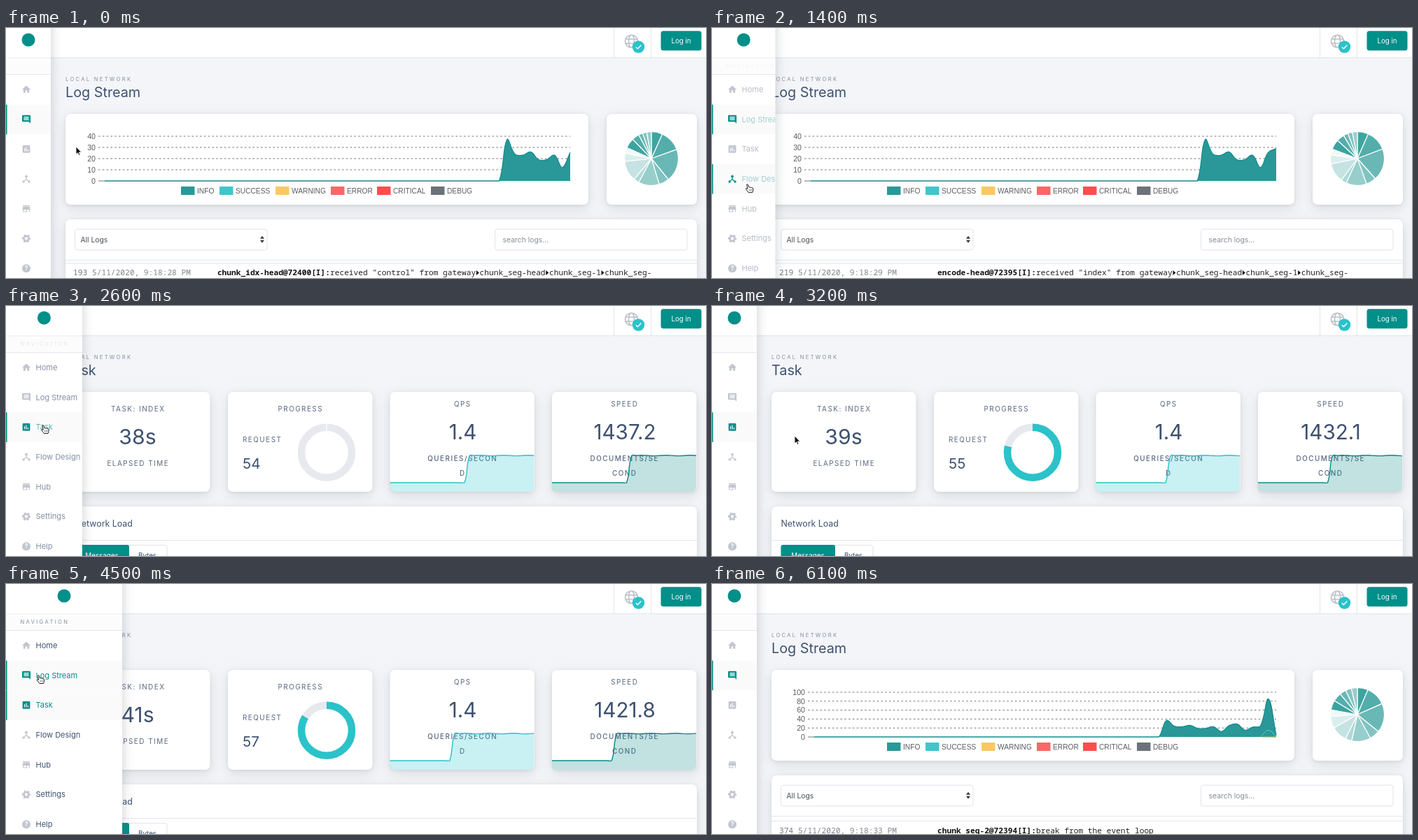
Animation, 1000 px wide and 358 px high, one loop 6200 ms. Source, as an HTML page:

```html
<!DOCTYPE html>
<html lang="en">
<head>
<meta charset="utf-8">
<title>Log dashboard</title>
<style>
html, body { margin: 0; width: 100%; height: 100%; overflow: hidden; background: #f4f5f9; }
svg { display: block; width: 1000px; height: 358px; font-family: Inter, Roboto, sans-serif; }
text { white-space: pre; }
.card { fill: #fff; filter: drop-shadow(0 1px 2px #5a616924) drop-shadow(0 5px 9px #5a61692c); }
.side { fill: #fff; filter: drop-shadow(0 0 8px #5a616950); }
.mono { font-family: "Noto Sans Mono", "DejaVu Sans Mono", monospace; }
.chart { font-family: "Liberation Sans", Arial, sans-serif; }
</style>
</head>
<body>
<svg id="stage" viewBox="0 0 1000 358"></svg>
<script>
const LOOP = 6200, STEP = 100;
const TEAL = '#008f89', CYAN = '#2bc2c9', INK = '#3d5170', LINE = '#e3e6ec';
const stage = document.getElementById('stage');

const clamp = v => Math.max(0, Math.min(1, v));
const easeOut = p => 1 - (1 - clamp(p)) ** 4;

// keys: [time, value, value...]; smooth steps between them
function track(keys, t) {
  let i = 0;
  while (i < keys.length - 2 && t >= keys[i + 1][0]) i++;
  const a = keys[i], b = keys[i + 1];
  const p = clamp((t - a[0]) / (b[0] - a[0])), s = p * p * (3 - 2 * p);
  return a.slice(1).map((v, k) => v + (b[k + 1] - v) * s);
}
const at = (rows, t) => rows.filter(r => r[0] <= t).pop();

const rect = (x, y, w, h, fill, extra = '') =>
  `<rect x="${x}" y="${y}" width="${w}" height="${h}" fill="${fill}" ${extra}/>`;
const card = (x, y, w, h) => `<rect class="card" x="${x}" y="${y}" width="${w}" height="${h}" rx="7"/>`;
const path = (d, fill, extra = '') => `<path d="${d}" fill="${fill}" ${extra}/>`;
const stroke = (d, color, width = 1, extra = '') =>
  path(d, 'none', `stroke="${color}" stroke-width="${width}" ${extra}`);
// y is the middle of the capitals
const text = (x, y, str, size, fill, extra = '') =>
  `<text x="${x}" y="${y + size * 0.363}" font-size="${size}" fill="${fill}" ${extra}>${str}</text>`;
const mid = (x, y, str, size, fill, gap = 0, extra = '') =>
  text(x + gap / 2, y, str, size, fill, `text-anchor="middle" letter-spacing="${gap}" ${extra}`);

// Smooth line through points, clamped below by floor
function curve(pts, floor, tension = 0.4) {
  const ctrl = pts.map((p, i) => {
    const a = pts[i - 1] || p, b = pts[i + 1] || p;
    const da = Math.hypot(p[0] - a[0], p[1] - a[1]), db = Math.hypot(b[0] - p[0], b[1] - p[1]);
    const move = f => [p[0] + f * (b[0] - a[0]), Math.min(floor, p[1] + f * (b[1] - a[1]))];
    return [move(-tension * da / (da + db)), move(tension * db / (da + db))];
  });
  return 'M' + pts[0] + pts.slice(1).map((p, i) => `C${ctrl[i][1]} ${ctrl[i + 1][0]} ${p}`).join('');
}

// ---- log stream page ----
const COUNTS = [37, 24, 23, 26, 19, 19, 23, 12, 25.5, 29, 15, 22, 25, 85, 4];
const LEGEND = [[250, 'INFO', '#2a9898'], [305, 'SUCCESS', '#41c5cb'], [385, 'WARNING', '#fac863'],
  [464, 'ERROR', '#fb6666'], [530, 'CRITICAL', '#fd4d4d'], [607, 'DEBUG', '#6c7279']];
// slice edges in degrees, drifting from the first set to the second
const PIE = [0, 24, 70, 141, 163, 208, 220, 264, 282, 294, 316, 332, 341, 350, 360];
const PIE_END = [0, 23, 66, 129, 151, 192, 206, 240, 266, 280, 301, 320, 334, 347, 360];

const ROUTE = 'gateway>chunk_seg-head>chunk_seg-1>chunk_seg-';
const LOGS = [
  [0, 193, 28, 'chunk_idx-head@72400', `received "control" from ${ROUTE}`, 350],
  [200, 199, 28, 'encode-2@72397', `received "index" from ${ROUTE}`, 345],
  [400, 204, 28, 'chunk_seg-1@72393', 'received "index" from gateway>chunk_seg-head>⚐', 350],
  [600, 210, 29, 'doc_idx-0@72402', `received "index" from ${ROUTE}`, 346],
  [800, 215, 29, 'join_all-0@72404', `received "index" from ${ROUTE}`, 351],
  [1200, 219, 29, 'encode-head@72395', `received "index" from ${ROUTE}`, 350],
  [1500, 0, 0, '', 'tail>encode-head>encode-2>⚐', 343.5],
  [4600, 228, 30, 'join_all-0@72404', 'collected 2/2 parts of IndexRequest', 343.5],
  [5500, 262, 31, 'encode-1@72396', `received "index" from ${ROUTE}`, 350],
  [5700, 305, 32, 'chunk_idx-1@72401', `received "control" from ${ROUTE}`, 347],
  [5900, 352, 33, 'chunk_seg-1@72393', 'break from the event loop', 351],
  [6000, 374, 33, 'chunk_seg-2@72394', 'break from the event loop', 352.5]
];
const CHAR = 6.72;

function logRow(t) {
  const [, num, sec, name, msg, y] = at(LOGS, t);
  let s = '', x = 463;
  if (num) {
    s += text(96, y, num, 11.2, '#70757c', 'font-weight="500"');
    s += text(123, y, `5/11/2020, 9:18:${sec} PM`, 11.2, '#80858c');
    s += text(463, y, name + '[I]:', 11.2, '#111', 'text-anchor="end" font-weight="700"');
  }
  msg.split('>').forEach((part, i) => {
    if (i) {
      s += path(`M${x + 0.6} ${y - 3}l4 3.5l-4 3.5z`, '#111');
      x += 5.3;
    }
    s += text(x, y, part, 11.2, '#222');
    x += part.length * CHAR;
  });
  const edge = v => v > 334 ? stroke(`M85 ${v}H987`, LINE) : '';
  return `<g class="mono">${s}</g>` + edge(y - 13) + edge(y + 12);
}

function lineChart(t) {
  const tall = t >= 5400, n = t < 1400 ? 9 : t < 4600 ? 10 : t < 5800 ? 14 : 15;
  const max = tall ? 100 : 40, tick = tall ? 20 : 10, x0 = tall ? 146 : 141;
  const grow = t >= 4600 ? easeOut((t - 5300) / 600) : 1;
  const point = (v, i) => [+(x0 + (806 - x0) * i / 59).toFixed(1), +(219 - v * grow * 64 / max).toFixed(1)];
  const vals = [...Array(60 - n).fill(0), ...COUNTS.slice(0, n)];
  let s = '';
  for (let v = 0; v <= max; v += tick) {
    const y = 219 - v * 64 / max;
    s += text(x0 - 13, y, v, 10.6, '#5a5d61', 'text-anchor="end"');
    s += v ? stroke(`M${x0 - 9} ${y}H806`, '#777', 1, 'stroke-dasharray="2.6 3.2"') : stroke(`M${x0 - 9} 219H${x0}`, '#777');
  }
  const d = curve(vals.map(point), 219);
  s += path(d + 'V219Z', '#2a9898') + stroke(d, '#108c8c', 1.3);
  if (n === 15) {
    s += stroke(curve([[0, 57], [15, 58], [1, 59]].map(p => point(...p)), 219), '#5fd0d4');
    s += stroke('M786 219.3H806', '#fac863', 1.2);
  }
  LEGEND.forEach(([x, label, color]) => {
    s += rect(x, 227, 19.5, 12, color) + text(x + 23, 233, label, 10.2, '#5a5d61');
  });
  return `<g class="chart">${s}</g>`;
}

function pie(t) {
  const turn = t >= 4600 ? easeOut((t - 4600) / 1000) : 1;
  const edge = i => {
    const deg = PIE[i] + (PIE_END[i] - PIE[i]) * t / LOOP, a = deg * turn * Math.PI / 180;
    return `${922 + 38.5 * Math.sin(a)} ${187 - 38.5 * Math.cos(a)}`;
  };
  return PIE.slice(1).map((_, i) => {
    const alpha = 0.79 - (i % 9) * 0.092;
    return path(`M922 187L${edge(i)}A38.5 38.5 0 0 1 ${edge(i + 1)}Z`, '#0a8b87',
      `fill-opacity="${alpha}" stroke="#fff" stroke-width="1.2"`);
  }).join('');
}

function heading(title) {
  return text(85, 73, 'LOCAL NETWORK', 7.6, '#818ea3', 'letter-spacing="2.3"') +
    text(85, 92, title, 19.8, INK);
}

function logPage(t) {
  const box = x => rect(x, 288, 274.5, 30, '#fff', 'rx="3.5" stroke="#dfe3ea"');
  let s = heading('Log Stream') + card(85, 123, 747, 130) + card(858, 123, 129, 130) +
    lineChart(t) + pie(t) + card(85, 274, 902, 110) + box(98.5) + box(698.5) +
    text(106.5, 303, 'All Logs', 10.3, '#495057') +
    path('M363 301.8l3-4l3 4zM363 303.8l3 4l3-4z', '#343a40') +
    text(709.5, 303, 'search logs...', 10.4, '#868e96') +
    stroke('M85 332.5H987', LINE) + logRow(t);
  if (t >= 4600 && t < 5500)
    s += rect(854.5, 338.5, 115, 30, '#fff', 'rx="3" stroke="#dfe3ea"') +
      stroke('M871 346v8.5m-3.3-3.3l3.3 3.3l3.3-3.3', '#333', 1.1) +
      text(880, 350.5, 'Back to Bottom', 10.5, '#333');
  return s;
}

// ---- task page ----
function spark(x, color, tick) {
  const pts = Array.from({length: 30}, (_, i) =>
    [x + 206 * i / 29, i <= 15 - tick ? 253 : 214.2 + 0.4 * Math.sin((i + tick) * 1.3)]);
  const d = curve(pts, 254);
  return path(`${d}V259q0 7-7 7H${x + 7}q-7 0-7-7Z`, color, 'fill-opacity=".25"') + stroke(d, color, 1.4);
}

function taskPage(t) {
  const tick = t < 3000 ? 0 : t < 3400 ? 1 : t < 3900 ? 2 : 3;
  const small = (x, y, str, extra) => mid(x, y, str, 9.9, '#5a6880', 1.5, extra);
  const stat = (x, name, value, unit, color) =>
    small(x + 103, 140, name) + mid(x + 104, 180.5, value, 29.6, INK) +
    unit.map((u, i) => small(x + 103, 218.5 + 21 * i, u, 'font-weight="500"')).join('') + spark(x, color, tick);
  const len = 2 * Math.PI * 36, part = (54 + tick) / 68 * easeOut((t - 2600) / 1000);
  const ring = (color, extra = '') =>
    `<circle cx="458" cy="209.7" r="36" fill="none" stroke="${color}" stroke-width="10.5" ${extra}/>`;
  return heading('Task') + [85, 317, 548.5, 780].map(x => card(x, 123, 206.5, 143)).join('') +
    small(188, 147, 'TASK: INDEX') + mid(188, 187.5, 38 + tick + 's', 30.2, INK) + small(188, 225.5, 'ELAPSED TIME') +
    small(420, 147, 'PROGRESS') + text(338, 191.5, 'REQUEST', 9.9, '#5a6880', 'letter-spacing="1.5"') +
    text(338, 225.5, 54 + tick, 20.6, INK) + ring('#e7e9ef') +
    (part > 0 ? ring(CYAN, `stroke-dasharray="${part * len} ${len}" transform="rotate(-90 458 209.7)"`)
      : stroke('M458 168V180', '#fff', 1.2)) +
    stat(548.5, 'QPS', '1.4', ['QUERIES/SECON', 'D'], CYAN) +
    stat(780, 'SPEED', (1437.2 - 5.133 * tick).toFixed(1), ['DOCUMENTS/SE', 'COND'], '#088a86') +
    card(85, 287, 902, 90) + text(98.5, 311, 'Network Load', 12.4, INK) + stroke('M85 335.5H987', LINE) +
    rect(98.5, 342.5, 131.5, 30, '#fff', 'rx="3" stroke="#dfe3ea"') + rect(98.5, 342, 77.5, 30, TEAL, 'rx="3"') +
    mid(137, 357, 'Messages', 9.8, '#fff') + mid(202, 357, 'Bytes', 9.8, INK);
}

// ---- frame around the pages ----
const NAV = [
  ['Home', 'M10 20v-6h4v6h5v-8h3L12 3 2 12h3v8z'],
  ['Log Stream', 'M22 4q0-2-2-2H4q-2 0-2 2v12q0 2 2 2h14l4 4zM18 14H6v-2h12zm0-3H6V9h12zm0-3H6V6h12z'],
  ['Task', 'M19 3H5q-2 0-2 2v14q0 2 2 2h14q2 0 2-2V5q0-2-2-2zM9 17H7v-7h2zm4 0h-2V7h2zm4 0h-2v-4h2z'],
  ['Flow Design', 'M17 16l-4-4V8.8a3 3 0 1 0-2 0V12l-4 4H3v5h5v-3l4-4.2 4 4.2v3h5v-5z'],
  ['Hub', 'M20 4H4v2h16zm1 10v-2l-1-5H4l-1 5v2h1v6h10v-6h4v6h2v-6zm-9 4H6v-4h6z'],
  ['Settings', ''],
  ['Help', '']
];

function icon(i, color) {
  const circle = (r, extra) => `<circle cx="12" cy="12" r="${r}" ${extra}/>`;
  const outline = `fill="none" stroke="${color}" stroke-width="4.4"`;
  if (i === 5) return circle(5.8, outline) + circle(8, outline + ' stroke-dasharray="4.6 3.777" stroke-dashoffset="2.3"');
  if (i === 6) return circle(10, `fill="${color}"`) + mid(12, 12, '?', 14, '#fff', 0, 'font-weight="700"');
  return path(NAV[i][1], color, 'fill-rule="evenodd"');
}

function sidebar(w, active, hover) {
  const open = clamp((w - 64) / 102), shown = clamp((w - 64) / 70);
  let s = stroke(`M0 43H${w}M0 66.5H${w}`, LINE) + rect(0, 43.5, w, 22.5, '#fcfcfd') +
    `<circle cx="${w / 2}" cy="17" r="9.5" fill="${TEAL}"/>` +
    text(20.5, 54.5, 'NAVIGATION', 7.6, '#818ea3', `letter-spacing="2.35" opacity="${open ** 2}"`);
  NAV.forEach(([label], i) => {
    const y = 88 + 42.7 * i, on = i === active || i === hover;
    if (on) s += rect(0, y - 21, w, 42.5, '#fbfafb') + rect(0, y - 21, 1.5, 42.5, TEAL);
    s += `<g transform="translate(29 ${y}) scale(.6) translate(-12 -12)">${icon(i, on ? TEAL : '#c2c6d0')}</g>`;
    s += text(42.5, y, label, 11, on ? TEAL : INK, `opacity="${shown}"`);
  });
  return `<rect class="side" y="-20" width="${w}" height="400"/>
    <clipPath id="side"><rect width="${w}" height="358"/></clipPath><g clip-path="url(#side)">${s}</g>`;
}

function header() {
  return rect(0, 0, 1000, 42, '#fff') + stroke('M0 42.5H1000M868.5 0V42M921.5 0V42', '#e1e5eb') +
    stroke('M884.5 19a9 9 0 1 0 18 0a9 9 0 1 0-18 0M889.5 19a4 9 0 1 0 8 0a4 9 0 1 0-8 0M885.5 16h16M885.5 22h16', '#bcc1ca', 1.7) +
    `<circle cx="903.5" cy="27" r="8.7" fill="${CYAN}"/>` + stroke('M899.8 27.2l2.6 2.6l5-5.2', '#fff', 1.4) +
    rect(935.5, 4.3, 58, 28, TEAL, 'rx="3.5"') + mid(964.5, 18.5, 'Log in', 9.7, '#fff');
}

function cursor(x, y, hand) {
  const shape = hand
    ? path('M2 1q1.5-1 2 .5l1 3.5q1.5-.8 2 .3q1.5-.7 2 .4q1.7-.4 2 1.3q.5 3-1 5.500H4.500L1 8q-.8-1.500.7-1.700l1.500 1.200z', '#fff',
      'stroke="#222" stroke-width="1"') + stroke('M5.5 7.5v3M7.3 7.5v3M9 7.5v3', '#444', 0.6)
    : path('M0 0V11l2.5-2.3l1.6 3.6l1.8-.8l-1.6-3.5H7.7Z', '#111', 'stroke="#fff" stroke-width=".8"');
  return `<g transform="translate(${x} ${y})">${shape}</g>`;
}

const WIDTH = [[0, 64], [1300, 64], [1600, 166], [2400, 166], [2770, 64], [3500, 64], [3800, 166], [4500, 166], [4800, 64]];
const MOUSE = [[0, 100, 170], [100, 100, 170], [700, 210, 303], [950, 210, 303], [1350, 48, 225], [1800, 39, 170],
  [2300, 44, 170], [2600, 50, 170], [2800, 50, 170], [3100, 118, 186], [3300, 118, 186], [3600, 40, 150],
  [4000, 25, 109], [4300, 42, 130], [4600, 44, 130], [4900, 110, 380]];

function draw(t) {
  const [w] = track(WIDTH, t), [x, y] = track(MOUSE, t);
  const task = t >= 2500 && t < 4600;
  const onNav = x < w, onSelect = !task && x > 98 && x < 373 && y > 288 && y < 318;
  const hover = onNav && w > 64 ? Math.round((y - 88) / 42.7) : -1;
  stage.innerHTML = rect(0, 0, 1000, 358, '#f4f5f9') + (task ? taskPage(t) : logPage(t)) +
    header() + sidebar(w, task ? 2 : 1, hover) + cursor(x, y, onNav || onSelect);
}

let last = -1;
function frame() {
  const t = Math.floor(performance.now() % LOOP / STEP) * STEP;
  if (t !== last) draw(last = t);
  requestAnimationFrame(frame);
}
frame();
</script>
</body>
</html>
```
